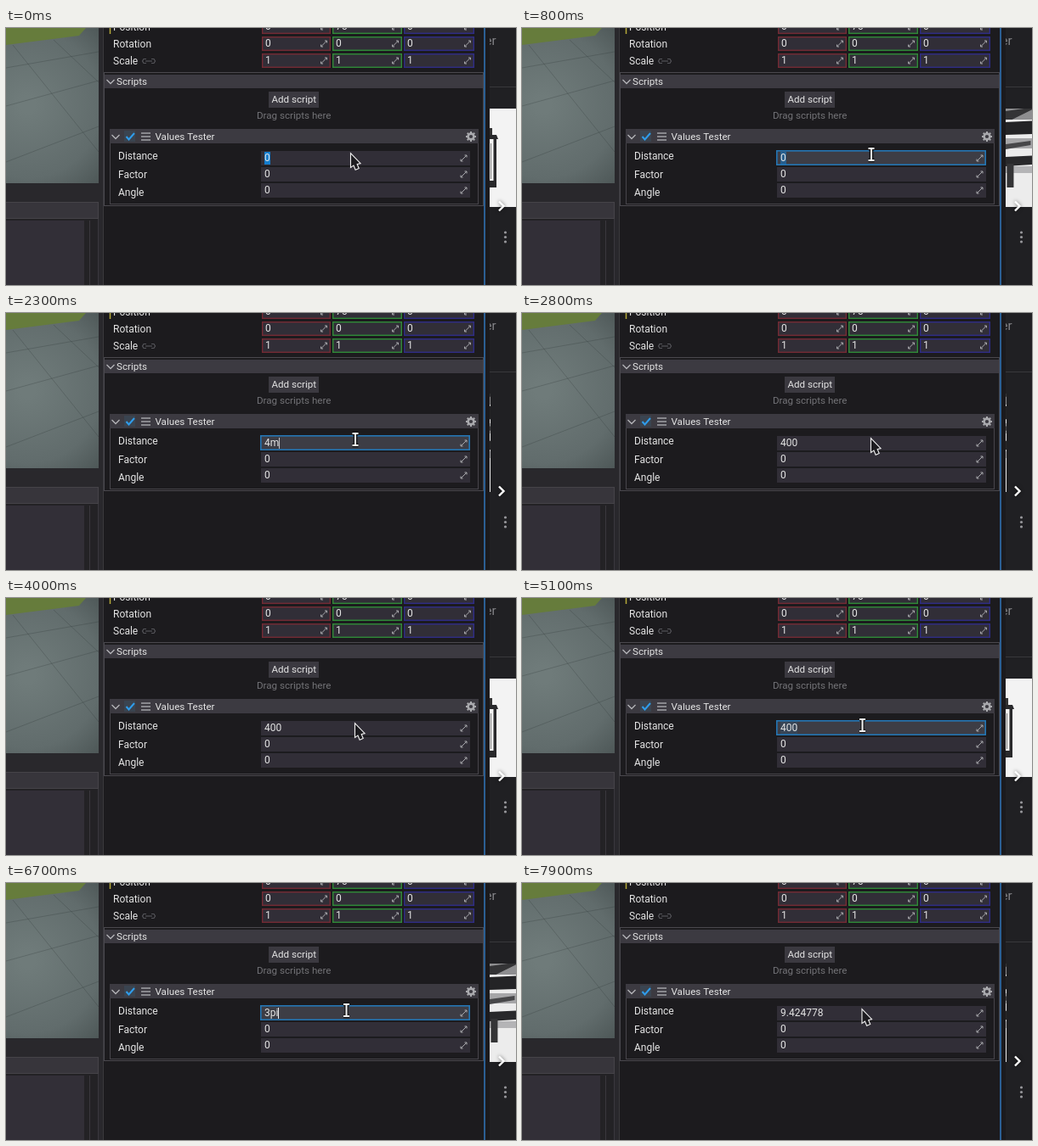
Write an HTML page with a canvas that moves like this. It is 600 px wide and 303 px high and loops after 8 s.

```html
<!DOCTYPE html>
<html lang="en">
<head>
<meta charset="utf-8">
<title>Values Tester</title>
<style>
html, body { margin: 0; width: 100%; height: 100%; overflow: hidden; background: #1c1b1e; }
canvas { display: block; }
</style>
</head>
<body>
<canvas id="stage" width="600" height="303"></canvas>
<script>
const c = document.getElementById('stage').getContext('2d');
const LOOP = 8000;
const BLUE = '#2476b4', WHITE = '#e4e4e4', FIELD = '#312e37', HEADER = '#3c3a41', PANEL = '#1c1b1e';

function rect(x, y, w, h, color) {
  c.fillStyle = color;
  c.fillRect(x, y, w, h);
}
function frame(x, y, w, h, color, width = 1) {
  c.strokeStyle = color;
  c.lineWidth = width;
  c.strokeRect(x + width / 2, y + width / 2, w - width, h - width);
}
function line(points, color, width = 1) {
  c.strokeStyle = color;
  c.lineWidth = width;
  c.beginPath();
  points.forEach(p => c.lineTo(...p));
  c.stroke();
}
function shape(points, fill, stroke, width = 1) {
  c.beginPath();
  points.forEach(p => c.lineTo(...p));
  c.closePath();
  if (stroke) {
    c.strokeStyle = stroke;
    c.lineWidth = width;
    c.stroke();
  }
  c.fillStyle = fill;
  c.fill();
}
function text(str, x, y, color = WHITE, size = 12) {
  c.font = size + 'px Roboto, sans-serif';
  c.fillStyle = color;
  c.fillText(str, x, y);
}
function clipped(x, y, w, h, draw) {
  c.save();
  c.beginPath();
  c.rect(x, y, w, h);
  c.clip();
  draw();
  c.restore();
}
function circle(x, y, r, color) {
  c.fillStyle = color;
  c.beginPath();
  c.arc(x, y, r, 0, 7);
  c.fill();
}

const progress = (t, from, to) => Math.min(1, Math.max(0, (t - from) / (to - from)));
const ease = k => k * k * (3 - 2 * k);

function expandIcon(x, y) {
  const color = '#a9a9ad';
  line([[x - 3.5, y + 3.5], [x + 3.5, y - 3.5]], color);
  line([[x + 1, y - 3.5], [x + 3.5, y - 3.5], [x + 3.5, y - 1]], color);
  line([[x - 1, y + 3.5], [x - 3.5, y + 3.5], [x - 3.5, y + 1]], color);
}
function chevronDown(x, y) {
  line([[x - 4.5, y - 2], [x, y + 2.5], [x + 4.5, y - 2]], '#b4b4b8', 1.3);
}

function viewport() {
  clipped(0, 0, 109, 183, () => {
    const floor = c.createRadialGradient(25, 90, 10, 25, 90, 150);
    floor.addColorStop(0, '#6f7b7a');
    floor.addColorStop(.55, '#616c6c');
    floor.addColorStop(1, '#414a4a');
    rect(0, 0, 109, 183, floor);
    const seam = 'rgba(40,50,50,.25)';
    line([[0, 47], [109, 28]], seam);
    line([[0, 92], [109, 62]], seam);
    line([[0, 158], [109, 116]], seam);
    line([[56, 14], [109, 64]], seam);
    line([[8, 20], [109, 146]], seam);
    shape([[0, 0], [94, 0], [86, 9], [0, 20]], '#667c3c');
  });
  rect(0, 183, 114, 23, '#29282c');
  rect(109, 0, 5, 303, '#29282c');
  rect(0, 206, 109, 19, '#37353b');
  frame(-1, 205, 110, 20, '#454348');
  rect(0, 225, 109, 78, '#232225');
  rect(0, 227, 92, 76, '#322f37');
  line([[98.5, 227], [98.5, 303]], '#3a383e');
  line([[108.5, 225], [108.5, 303]], '#3a383e');
}

function transform() {
  line([[122.5, 0], [122.5, 7]], '#b5aa38', 1.5);
  const borders = ['#742a34', '#2f8a37', '#2f2c86'];
  const lefts = [301, 384, 468], widths = [81, 82, 83];
  const rows = [['Position', '0', '75', '0'], ['Rotation', '0', '0', '0'], ['Scale', '1', '1', '1']];
  rows.forEach(([label, ...values], row) => {
    const top = -10 + row * 20;
    text(label, 126, top + 13);
    values.forEach((value, i) => {
      rect(lefts[i], top, widths[i], 17, FIELD);
      frame(lefts[i], top, widths[i], 17, borders[i], 1.4);
      text(value, lefts[i] + 4, top + 12);
      expandIcon(lefts[i] + widths[i] - 8, top + 8.5);
    });
  });
  const link = '#55555a';
  line([[165, 36.5], [162, 36.5], [160.5, 39], [162, 41.5], [165, 41.5]], link, 1.2);
  line([[171, 36.5], [174, 36.5], [175.5, 39], [174, 41.5], [171, 41.5]], link, 1.2);
  line([[164, 39], [172, 39]], link, 1.2);
}

function scripts() {
  frame(115, 52, 447, 158, '#4a484e');
  rect(116, 55, 445, 16, HEADER);
  chevronDown(123, 63);
  text('Scripts', 130, 67, WHITE, 11.6);
  rect(309, 75, 59, 19, '#3b3940');
  text('Add script', 312.5, 88, WHITE, 11.6);
  text('Drag scripts here', 295, 107, '#737377', 11.6);

  frame(122, 119, 434, 89, '#47454b');
  rect(122, 119, 434, 17, HEADER);
  chevronDown(129, 128);
  rect(139, 121, 13, 13, '#3a4450');
  line([[141.5, 128], [144.5, 131.5], [151, 124]], '#2f9dec', 2);
  for (let y = 123; y < 133; y += 4) rect(159, y, 11, 2, '#88888d');
  text('Values Tester', 175.5, 132, WHITE, 11.6);
  c.strokeStyle = '#a9a9ad';
  c.lineWidth = 2.6;
  c.beginPath();
  c.arc(547, 128, 3.4, 0, 7);
  c.stroke();
  for (let i = 0; i < 8; i++) {
    const a = i * Math.PI / 4;
    line([[547 + 4 * Math.cos(a), 128 + 4 * Math.sin(a)], [547 + 6 * Math.cos(a), 128 + 6 * Math.sin(a)]], '#a9a9ad', 2);
  }
  [['Distance', 155, 145], ['Factor', 177, 164], ['Angle', 198, 183]].forEach(([label, base, top]) => {
    text(label, 132, base);
    rect(300, top, 246, 17, FIELD);
    expandIcon(538.5, top + 8.5);
    if (label !== 'Distance') text('0', 304, top + 12);
  });
}

const edits = [[0, '0'], [1400, '4'], [1950, '4m'], [2400, '400'], [5600, '3'], [6000, '3p'], [6300, '3pi'], [7250, '9.424778']];

function distance(t) {
  const value = edits.filter(e => e[0] <= t).pop()[1];
  const focused = t >= 400 && t < 2400 || t >= 4800 && t < 7250;
  const selected = t < 1400 || t >= 4800 && t < 5600;
  const low = t < 4000 ? 1600 : 5100;
  const pulse = t < 400 ? 1 : .5 - .5 * Math.cos((t - low) / 1047 * 2 * Math.PI);
  c.font = '12px Roboto, sans-serif';
  const width = Math.round(c.measureText(value).width);
  if (focused) {
    rect(299, 144, 247, 18, '#3d3d45');
    frame(299, 144, 247, 18, BLUE, 1.6);
    expandIcon(538.5, 153.5);
  }
  if (selected) rect(304, 146, width, 15, `rgba(20,125,205,${.12 + .88 * pulse})`);
  text(value, 304, 157);
  if (focused && !selected) rect(304 + width, 147, 1, 13, `rgba(240,240,240,${pulse})`);
  return focused;
}

function cursor(t, focused) {
  const x = 406 + 5 * ease(progress(t, 400, 800)) - 10.5 * ease(progress(t, 4500, 4800));
  const y = 149 + ease(progress(t, 4500, 4800));
  c.save();
  c.translate(x, y);
  if (focused) {
    for (const [color, width] of [['#151517', 4.6], ['#f2f2f2', 2]]) {
      line([[-3.5, -7], [3.5, -7]], color, width);
      line([[0, -7], [0, 7]], color, width);
      line([[-3.5, 7], [3.5, 7]], color, width);
    }
  } else {
    shape([[0, 0], [0, 14.5], [3.2, 12.3], [5.4, 17.5], [8.5, 16.2], [6.4, 11.2], [10, 10.3]], '#1d1c20', '#f0f0f0', 2.2);
  }
  c.restore();
}

function lantern(x, left) {
  rect(x + left, 95, 50 - left, 116, '#f3f3f3');
  rect(x, 118, 3, 10, '#333');
  shape([[x - 12, 131], [x - 6, 126], [x + 8, 126], [x + 10, 131]], '#29292b');
  rect(x + 4.5, 131, 3.5, 50, '#29292b');
  rect(x - 9, 131, 3, 50, '#29292b');
  rect(x + 1, 136, 1, 42, '#777');
  shape([[x - 12, 188], [x - 10, 180], [x + 8, 180], [x + 8, 188]], '#29292b');
}
function machine(x, width) {
  clipped(x, 95, width, 116, () => {
    rect(x, 95, width, 116, '#ececec');
    for (let u = x - 24; u < x + width; u += 62) {
      rect(u, 95, 62, 13, '#8e8e90');
      shape([[u, 98], [u + 22, 95], [u + 34, 95], [u + 8, 108], [u, 108]], '#343436');
      shape([[u, 111], [u + 62, 108], [u + 62, 124], [u, 126]], '#242426');
      rect(u, 130, 62, 12, '#a6a6a8');
      shape([[u, 137], [u + 30, 133], [u + 30, 138], [u, 143]], '#474749');
      shape([[u, 152], [u + 62, 149], [u + 62, 159], [u, 163]], '#29292b');
      rect(u, 163, 62, 8, '#b4b4b6');
      rect(u + 2, 160, 8, 28, '#343436');
      rect(u + 36, 160, 8, 28, '#343436');
    }
  });
}

function webPage(t) {
  rect(565, 0, 35, 303, '#1b1a1d');
  rect(569, 0, 31, 303, '#202023');
  clipped(569, 0, 31, 303, () => {
    text('er', 563.5, 20, '#858589', 15);
    rect(569, 69, 31, 1, '#39393c');
    const slide = (ease(progress(t, 400, 1200)) + ease(progress(t, 3400, 3950)) + ease(progress(t, 6300, 7100))) * 300 % 600;
    const x = 569 - slide;
    lantern(x, -10);
    machine(x + 50, 251);
    lantern(x + 600, -250);
    c.shadowColor = 'rgba(0,0,0,.55)';
    c.shadowBlur = 4;
    line([[580, 204.5], [585.5, 210], [580, 215.5]], '#fff', 2.4);
    c.shadowColor = 'transparent';
    for (const y of [241, 246.5, 252]) circle(587.5, y, 1.6, '#97979b');
  });
}

function draw(now) {
  const t = now % LOOP;
  rect(0, 0, 600, 303, PANEL);
  viewport();
  line([[114.5, 0], [114.5, 303]], '#3a393d');
  transform();
  scripts();
  webPage(t);
  rect(562, 0, 2, 303, '#2b5f93');
  cursor(t, distance(t));
  requestAnimationFrame(draw);
}
requestAnimationFrame(draw);
</script>
</body>
</html>
```
